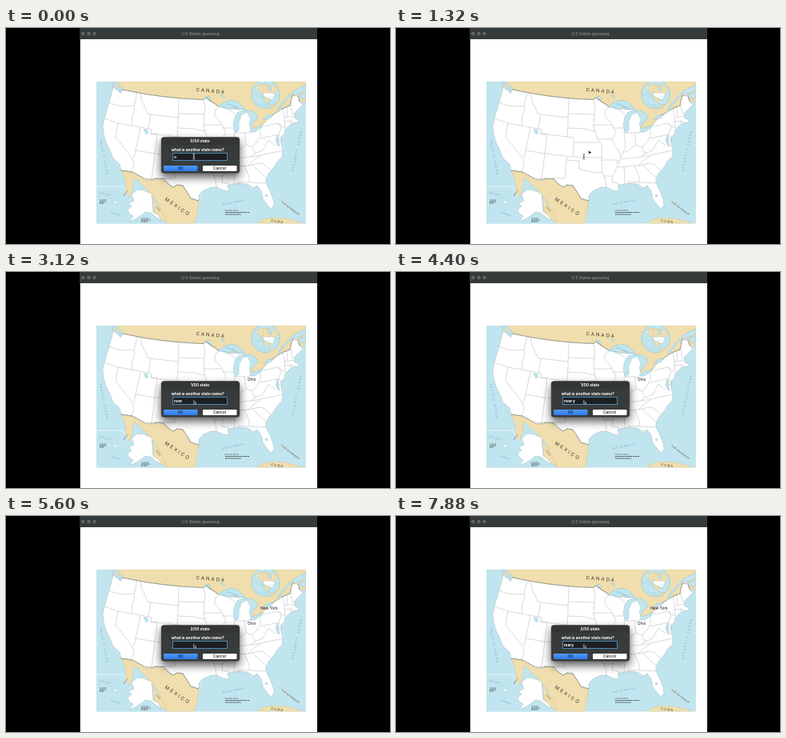
Animation, 480 px wide and 270 px high, one loop 8000 ms. Source, as an HTML page:

```html
<!DOCTYPE html>
<html lang="en">
<head>
<meta charset="utf-8">
<title>State guessing game</title>
<style>
  html, body { margin: 0; width: 100%; height: 100%; overflow: hidden; background: #000; }
  svg { display: block; width: 100%; height: 100%; font-family: Inter, Arial, sans-serif; }
  .land { fill: #f0deae; stroke: #b5a77c; stroke-width: .25; }
  .water { fill: #c1e5ee; stroke: #6fb3c8; stroke-width: .35; }
  .usa { fill: #fff; stroke: #8fa6ad; stroke-width: .35; }
  .states { fill: none; stroke: #a0a0a0; stroke-width: .4; }
  .border { fill: none; stroke: #5d584a; stroke-width: .6; stroke-dasharray: 2.5 .7; }
  .sea { fill: #68acc3; font-size: 3.6px; }
  .sea .small { font-size: 2.4px; }
  .country { fill: #383529; font-size: 6px; }
  .tiny { fill: #444; font-size: 2.1px; }
  .scale { fill: none; stroke: #222; stroke-width: .7; stroke-dasharray: 2.5 .6; }
  .label { fill: #111; font-size: 4.7px; }
  .middle { text-anchor: middle; }
  .dialog text { font-size: 4.8px; font-weight: 700; fill: #fff; }
</style>
</head>
<body>
<svg viewBox="0 0 480 270" preserveAspectRatio="none">
  <defs>
    <clipPath id="mapClip"><rect x="113" y="67" width="262" height="177.4"/></clipPath>
    <clipPath id="globeClip"><circle cx="324.5" cy="83" r="17.5"/></clipPath>
    <filter id="shadow" x="-30%" y="-40%" width="160%" height="200%">
      <feDropShadow dx="0" dy="5" stdDeviation="5.5" flood-opacity=".65"/>
    </filter>
    <linearGradient id="blue" x2="0" y2="1">
      <stop stop-color="#4f9bfb"/><stop offset="1" stop-color="#2f78ea"/>
    </linearGradient>
  </defs>

  <!-- Main window -->
  <rect x="92" width="297" height="270" fill="#353a3a"/>
  <rect x="93" y="14" width="296" height="256" fill="#fff"/>
  <g fill="#606565"><circle cx="96.2" cy="7" r="2.3"/><circle cx="103.4" cy="7" r="2.3"/><circle cx="110.6" cy="7" r="2.3"/></g>
  <text x="243" y="8.7" class="middle" font-size="4.9" font-weight="600" fill="#858989">U.S States guessing</text>

  <g clip-path="url(#mapClip)">
    <rect x="113" y="67" width="262" height="178" fill="#c1e5ee"/>

    <!-- Neighbouring countries -->
    <path class="land" d="M132 67L138 72L146 77Q195 88 247 89.5L253 88L258 93L266 98L280 100L297 101L302 105L308 110L304 127L312 126L321 121L327 114L333 109L340 103L347 100L355 97L358 84L365 85L369 93L375 91V67Z"/>
    <path class="water" d="M339 101L348 90L354 84L359 79L366 75L375 71V77L368 81L358 83L350 91L341 102Z"/>
    <path class="water" d="M366 83L375 80V87L370 89Z"/>
    <path class="water" d="M132 67H138L142 71L147 77L141 79L134 75Z"/>
    <path class="land" d="M134 69L139 71L143 76L138 75Z"/>
    <path class="land" d="M144 178L158 180L175 189L186 190V188L197 188.5L203 195L209 199L214 196L221 197L227 206L231 213L241 216L240 226L236 245H202L188 215L176 202L165 191L160 187L159 194L158 201L154 212L150 205L149 191Z"/>
    <path class="land" d="M313 244L322 239L335 237L349 238L362 241L372 245Z"/>
    <path class="land" d="M343 215l3 2 1 2zM350 218l2 3-1 1zM357 225l3 2-1 1zM364 231l4 2-2 1z"/>

    <!-- Contiguous states -->
    <path class="usa" d="M134 74L141 79L143 82L146 77Q195 88 247 89.5L250 87L254 91L266 98L272 100L280 101L290 102L299 102L302 105L307 110L305 126L312 127L321 121L327 114L333 109L340 103L347 100L355 97L356 90L358 84L362 82L365 85L367 92L371 96L365 102L360 107L361 113L366 115L365 118L360 118L354 122L349 127L348 133L344 136L344 145L346 153L345 161L339 167L335 174L329 181L325 188V194L330 204L334 214L335 222L331 226L325 219L321 213L319 204L314 197L309 200L302 195L293 194L284 195L277 197L279 204L272 203L263 199L256 199L247 203L241 209L241 216L231 213L227 206L221 197L214 196L209 199L203 195L197 188.5L186 188V190H175L158 180L144 178L142 170L134 163L130 153L125 143L122 132L121 122L123 113L126 103L129 93L132 82Z"/>

    <!-- Great Lakes -->
    <path class="water" d="M265 99L272 93L281 90L289 92L297 99L298 102L290 101L283 98L280 102L274 99Z"/>
    <path class="water" d="M286 131L284 121L286 111L290 105L299 103L302 105L295 108L291 117L291 128Z"/>
    <path class="water" d="M299 103L307 103L313 108L315 113L310 117L306 124L304 121L306 114L303 108Z"/>
    <path class="water" d="M304 130L308 125L314 124L321 120L318 125L311 130Z"/>
    <path class="water" d="M321 115L326 110L333 108L332 112Z"/>
    <path class="water" d="M172 127L176 127L178 131L175 133Z"/>
    <path class="water" d="M339 134l1 5 2 9-2-1-3-6z"/>
    <path class="water" d="M250 86l4-1 2 3-3 2zM269 83l3 1 1 3-3-1z"/>
    <path class="water" d="M325 208l2 1-1 2-2-1z"/>

    <!-- State lines -->
    <g class="states">
      <path d="M129 93L136 96L147 98L160 97M164 81L160 97L161 101L158 110L157 122M123 113L140 119L157 122L182 127M168 82L170 92L174 99L177 107L181 108L178 126M182 127L181 132L189 133M181 108L215 112M216 88L215 118L214 136"/>
      <path d="M140 119L137 136L158 163L160 170L157 180M168 125L162 153L160 162M162 153L186 157L221 161L257 162M189 133L186 157L182 190M181 132L214 136L222 137V143L221 161M213 161V165L211 188H197M213 165L229 166V176L236 178L245 180L258 181"/>
      <path d="M216 107L248 108M215 125L236 126L243 128L249 129M222 143L254 143M247 90L249 100L248 108L247 121L249 130L252 139L257 146V165L258 181L260 185L262 191L263 199M247 121H270M266 98L261 104V110L268 117L270 121L275 131L270 139L273 147L279 155L281 162L276 174L271 185L270 193L278 194L279 197M252 139H270M257 165H277L276 168H279M260 185H271"/>
      <path d="M274 101L282 104L287 108M271 125L285 125M285 131L287 148L284 156L281 162M286 131H304M298 131L300 146M284 156L292 152L300 146L308 149L314 142L318 135V124M318 124L340 119L344 124L341 133L318 138M281 164L313 160L346 153M276 174L303 172L308 171L316 169L322 170L331 178M303 172L310 165L318 160M285 173L286 195M298 172L304 186V193L290 192L291 195M304 193L323 194L325 192M308 171L316 179L325 187"/>
      <path d="M308 149L311 157L306 161M311 157L321 153L328 140L337 147M341 133L345 141L341 141L340 134M340 119L348 125M346 100L348 111L349 126M348 112L360 110M348 117L359 116M351 99L352 111M356 96L358 108M356 116L357 121"/>
    </g>
    <path class="border" d="M146 77Q195 88 247 89.5L250 87L266 98M333 109L347 100L355 97L358 84L365 85L367 92"/>
    <path class="border" d="M144 178L158 180L175 189H186V188L197 188.5L203 195L209 199L214 196L221 197L227 206L231 213L241 216"/>

    <!-- Alaska and Hawaii insets -->
    <path fill="#c1e5ee" d="M113 198H148L152 213L163 203L184 212L201 245H113Z"/>
    <path fill="none" stroke="#fff" stroke-width=".6" d="M113 198H147L152 212"/>
    <path class="land" d="M183 211L187 217L196 231L201 244L194 239L185 230Z"/>
    <path class="usa" d="M157 208L164 202L172 203L182 207L184 230L190 234L195 241L187 236L181 231L174 230L169 234L163 238L154 242L159 235L154 232L152 227L157 223L153 219L160 216Z"/>
    <path class="usa" d="M117 207l2-1 1 1-2 1zM124 209l3 1-2 1zM130 212l3 1-2 1zM135 215l4 2-1 3-3-2z"/>
    <path class="scale" d="M117 217h8M117 219h5M169 240h11M169 242h8M274 230.5h30M274 233h20"/>
    <g class="tiny">
      <text x="117" y="215.5">0 100 mi</text><text x="169" y="238.5">0 300 mi</text><text x="273" y="229">0 100 200 300 mi</text>
      <text transform="translate(187 223) rotate(53)">CANADA</text>
      <text transform="translate(148 210) rotate(-55)">MEXICO</text>
    </g>
    <g class="sea">
      <text class="small" transform="translate(116 206) rotate(13)">Pacific Ocean</text>
      <text class="small" transform="translate(131 231) rotate(18)">Bering Sea</text>
      <text class="small" transform="translate(275 95) rotate(20)">Lake Superior</text>
    </g>

    <!-- Locator globe -->
    <circle cx="324.5" cy="83" r="17.8" fill="#c1e5ee" stroke="#8ec3d1" stroke-width=".6"/>
    <g clip-path="url(#globeClip)">
      <path class="land" d="M312 74L318 70L328 71L337 73L340 78L336 82L333 90L328 89L329 95L324 91L320 83Z"/>
      <path class="water" d="M327 72l4 2 1 4-4-1z"/>
      <path class="usa" d="M320 81L333 81L337 83L333 90L328 88L323 86ZM312 74l5-1-2 4z"/>
      <path class="land" d="M330 96l6 0 5 5-10 0z"/>
      <path d="M307 83Q324 90 342 83M312 94Q325 100 338 94M324.5 65Q318 82 324.5 101" fill="none" stroke="#93c9d7" stroke-width=".3"/>
    </g>

    <!-- Map lettering -->
    <g class="country">
      <text transform="translate(237.5 79) rotate(5)" letter-spacing="2">CANADA</text>
      <text transform="translate(198 215) rotate(34)" letter-spacing="2.3">MEXICO</text>
      <text transform="translate(331 242) rotate(8)" style="font-size:4.2px" letter-spacing="1.1">CUBA</text>
      <text transform="translate(344 218) rotate(37)" style="font-size:2.8px" letter-spacing=".6">THE BAHAMAS</text>
    </g>
    <g class="sea">
      <text transform="translate(117 140) rotate(79)" letter-spacing="1.4">PACIFIC OCEAN</text>
      <text transform="translate(359.5 179) rotate(-78)" letter-spacing="1.5">ATLANTIC OCEAN</text>
      <text transform="translate(270 222) rotate(-12)" style="font-size:3.4px" letter-spacing=".5">Gulf of Mexico</text>
    </g>
  </g>

  <path id="turtle" d="M240.3 153.6L244.2 155.6L240.3 157.6L241.3 155.6Z"/>
  <text id="ohio" class="label middle" x="307.2" y="136">Ohio</text>
  <text id="newYork" class="label middle" x="329" y="117.3">New York</text>

  <g id="dialog" class="dialog">
    <rect x="194" y="136.5" width="98" height="45" rx="3.5" fill="#393a3b" stroke="#555" stroke-width=".5" filter="url(#shadow)"/>
    <path d="M194.3 146V140Q194.3 136.8 197.5 136.8H288.5Q291.7 136.8 291.7 140V146Z" fill="#343536"/>
    <text id="heading" class="middle" x="242.5" y="143.2"></text>
    <text class="middle" x="239.8" y="154.2">what is another state name?</text>
    <rect x="208.5" y="156.5" width="68" height="9" fill="#1d1f21" stroke="#4f87b5"/>
    <text id="entry" x="210" y="163" xml:space="preserve"></text>
    <rect id="caret" x="209.3" y="158.3" width=".6" height="5.6" fill="#ddd"/>
    <rect x="197" y="172" width="42.5" height="7" rx="1.2" fill="url(#blue)"/>
    <text class="middle" x="218" y="177.3" style="fill:#10203c;font-weight:500">OK</text>
    <rect x="246" y="172" width="42.5" height="7" rx="1.2" fill="#fff"/>
    <text class="middle" x="267" y="177.3" style="fill:#111;font-weight:500">Cancel</text>
  </g>

  <path id="beam" d="M233.4 157.6L234.8 158.3L236.2 157.6M234.8 158.3V163.2M233.4 163.9L234.8 163.2L236.2 163.9M234 161h1.6" fill="none" stroke-width=".8"/>
  <path id="arrow" d="M234.6 160.3V164.7L235.7 163.8L236.5 165.5L237.3 165.1L236.6 163.5H238Z" fill="#111" stroke="#fff" stroke-width=".5"/>
</svg>
<script>
const LOOP = 8000;
const byId = id => document.getElementById(id);
const show = (id, on) => byId(id).setAttribute('visibility', on ? 'visible' : 'hidden');
const within = (t, [from, to]) => t >= from && t < to;

// Each round: when the dialog opens and closes, and when its keys are pressed.
const rounds = [
  { open: 0, close: 1320, word: 'ohio', keys: [0, 480, 760, 1000] },
  { open: 1640, close: 5280, word: 'new york', keys: [2440, 2920, 3120, 3960, 4240, 4560, 4760, 4960] },
  { open: 5600, close: LOOP, word: 'mary', keys: [6760, 7080, 7520, 7720] }
];
const caretTimes = [[1960, 2240], [5800, 6200], [6460, 6760]];

function render(t) {
  const index = rounds.findIndex(r => within(t, [r.open, r.close]));
  const round = rounds[index];
  show('dialog', round);
  if (round) {
    const typed = round.keys.filter(key => key <= t).length;
    byId('heading').textContent = `${index}/50 state`;
    byId('entry').textContent = round.word.slice(0, typed);
  }
  show('caret', round && caretTimes.some(span => within(t, span)));

  const firstGuess = t < rounds[1].open;
  show('turtle', firstGuess);
  show('beam', firstGuess);
  byId('beam').setAttribute('stroke', round ? '#eee' : '#444');
  show('arrow', !firstGuess);
  show('ohio', !firstGuess);
  show('newYork', t >= rounds[2].open);
}

const start = performance.now();
function frame() {
  render((performance.now() - start) % LOOP);
  requestAnimationFrame(frame);
}
render(0);
requestAnimationFrame(frame);
</script>
</body>
</html>
```
